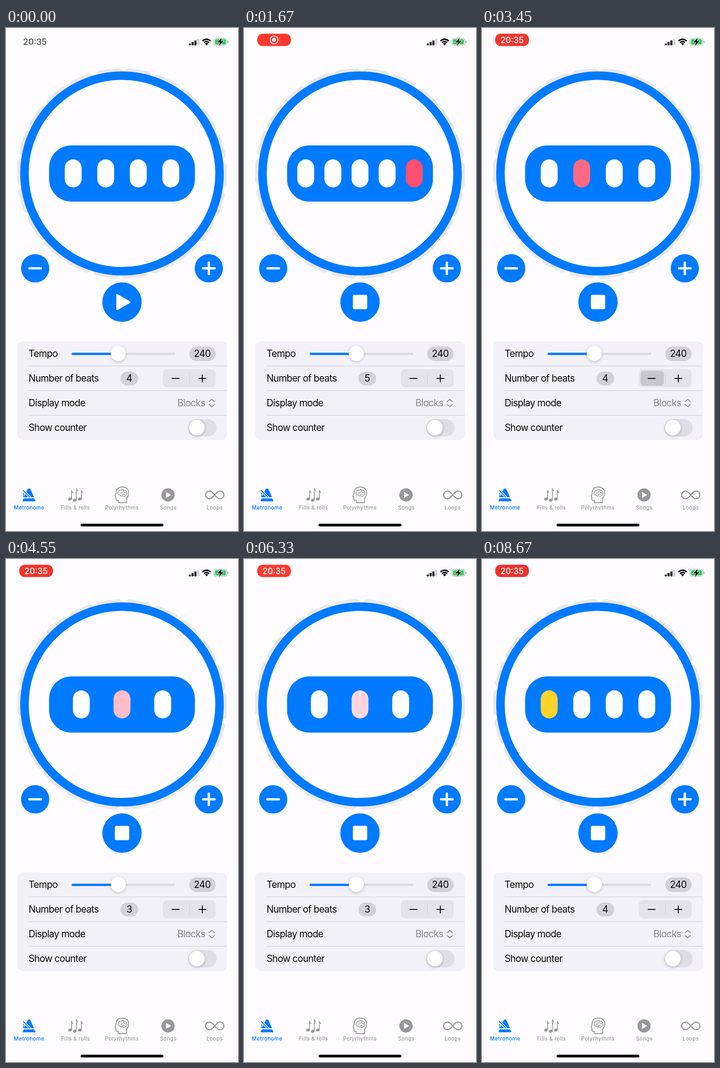
An HTML page for the animation above (8.7 s loop, 509x1101 px).

```html
<!DOCTYPE html>
<html lang="en">
<head>
<meta charset="utf-8">
<style>
  html, body { margin: 0; height: 100%; overflow: hidden; background: #fefcff; }
  svg { display: block; width: 509px; height: 1101px; }
  text { font-family: Inter, sans-serif; }
  .row text { font-size: 20.8px; letter-spacing: -.75px; fill: #0b0b0d; }
  .tab text { font-size: 11.5px; font-weight: 500; letter-spacing: .4px; text-anchor: middle; }
  .clock { font-size: 18.2px; text-anchor: middle; }
  .mid { text-anchor: middle; }
  .line { fill: none; stroke-linecap: round; stroke-linejoin: round; }
  .knob { fill: #fff; filter: drop-shadow(0 2px 3px #0003); }
</style>
</head>
<body>
<svg viewBox="0 0 509 1101">
  <g id="status">
    <text id="plainClock" class="clock" x="63.5" y="37.3" font-weight="600" fill="#5b5a5e">20:35</text>
    <g id="pill">
      <rect id="pillBack" x="29" y="12.5" width="74" height="27" rx="12"/>
      <g id="recIcon" fill="none" stroke="#fff" stroke-width="1.8">
        <circle cx="66" cy="26" r="8.6"/><circle cx="66" cy="26" r="4.4" fill="#fff" stroke="none"/>
      </g>
      <text id="pillClock" class="clock" x="66" y="33" font-weight="500" fill="#fff">20:35</text>
    </g>
    <g id="signal"></g>
    <g class="line" stroke="#000" stroke-width="3.2" style="stroke-linecap:butt">
      <path d="M431 28.4Q440 20.7 449 28.4M434.3 32Q440 27.2 445.7 32"/>
    </g>
    <path d="M436.4 34.3Q440 31.4 443.6 34.3L440 38Z"/>
    <rect x="456.5" y="22.5" width="28" height="15.5" rx="4.5" fill="none" stroke="#a5a4a8" stroke-width="1.2"/>
    <rect x="458.6" y="24.5" width="23.8" height="11.5" rx="2.8" fill="#34c759"/>
    <path d="M486 27.5q2.2 .6 2.2 2.8t-2.2 2.8z" fill="#a5a4a8"/>
    <path d="M473.5 21.5L463.5 31.5h6L467 39.5 477 29h-6z" stroke="#fff" stroke-width="1.6" paint-order="stroke"/>
  </g>

  <g id="teeth" fill="#e9e8ec" transform="rotate(1 254.5 318.3)"></g>
  <circle cx="254.5" cy="318.3" r="214" fill="#fefcff" stroke="#007aff" stroke-width="18.6"/>
  <rect x="94.5" y="257" width="320" height="123" rx="49" fill="#007aff"/>
  <g id="cells"></g>

  <g fill="#007aff">
    <circle id="minusButton" cx="64" cy="526" r="31"/>
    <circle cx="445" cy="526" r="31"/>
    <circle cx="254.5" cy="600" r="43.2"/>
  </g>
  <path class="line" stroke="#fff" stroke-width="5.2" d="M51.5 526h25M432.5 526h25M445 513.5v25"/>
  <path id="play" d="M244 584.5v31L271 600Z" fill="#fff" stroke="#fff" stroke-width="4" stroke-linejoin="round"/>
  <rect id="stop" x="238.8" y="584" width="31.5" height="31.5" rx="3.5" fill="#fff"/>

  <rect x="25" y="686" width="459.5" height="216" rx="12" fill="#f2f1f7"/>
  <path d="M49.5 739.7H484.5M49.5 793.7H484.5M49.5 847.7H484.5" stroke="#c9c8cd"/>
  <g class="row">
    <text x="49.5" y="720.3">Tempo</text>
    <text x="49.5" y="774.3">Number of beats</text>
    <text x="49.5" y="828.3">Display mode</text>
    <text x="49.5" y="882.3">Show counter</text>
    <path class="line" stroke="#dcdbe1" stroke-width="5" d="M146.5 713.2H369"/>
    <path class="line" stroke="#007aff" stroke-width="5" d="M146.5 713.2H246"/>
    <circle class="knob" cx="246.3" cy="712.3" r="16.6"/>
    <rect x="402" y="697" width="58" height="32" rx="16" fill="#d2d1d7"/>
    <text class="mid" x="430.6" y="720.3">240</text>
    <rect x="251" y="752" width="39" height="30.5" rx="15.2" fill="#d2d1d7"/>
    <text id="count" class="mid" x="270.2" y="774.3">4</text>
    <rect x="344" y="747" width="116" height="39.5" rx="9.5" fill="#e4e3e9"/>
    <path d="M402.5 756v22" stroke="#cecdd3"/>
    <rect id="press" x="348" y="750.5" width="51" height="32.5" rx="7" fill="#c7c6cc"/>
    <path id="stepMinus" class="line" stroke-width="2" d="M364.5 767h15.5"/>
    <path class="line" stroke="#0b0b0d" stroke-width="2" d="M423 767h15.5M430.7 759.2v15.6"/>
    <text x="376" y="828.3" style="fill:#8a898e">Blocks</text>
    <path class="line" stroke="#8a898e" stroke-width="1.7" d="M445.5 818l6-5 6 5M445.5 824l6 5 6-5"/>
    <rect x="400" y="856" width="62" height="38" rx="19" fill="#dfdee4"/>
    <circle class="knob" cx="418.7" cy="874.8" r="17"/>
  </g>

  <g class="tab" fill="#98979b">
    <g fill="#007aff">
      <path d="M39.5 1029.5H61Q64.5 1032 64.5 1036H36.500Q36.500 1032 39.500 1029.500Z"/>
      <path d="M47.500 1009.500Q50.500 1006 53.500 1009.500L61.500 1027H39L41.500 1021Z"/>
      <path d="M37.500 1012L53 1027.500" stroke="#fefcff" stroke-width="5"/>
      <path class="line" d="M38 1012.500L52 1026.500" stroke="#007aff" stroke-width="2"/>
      <path class="line" d="M38.500 1018v8.500h6" stroke="#007aff" stroke-width="1.500"/>
    </g>
    <g id="notes"></g>
    <path class="line" stroke="#98979b" stroke-width="1.9" d="M246.500 1039v-5h-3q-2.500 0-2.500-3v-5l-2-1.200 2.500-6q0-14 14-14 13.500 .5 13.500 13 0 7-4.500 11.500v9.700Z"/>
    <path class="line" stroke="#98979b" stroke-width="1.500" d="M247 1021q-3-2 0-5 0-5 5-4 4-4 7 0 6-1 6 5 2 5-3 6-2 4-6 1-4 2-5-2-4 1-4-1M251 1018q4 1 4-3M259 1012q-2 3 1 5 3-1 3 2M255 1022q1-3 5-1"/>
    <circle cx="355.500" cy="1022" r="14.500"/>
    <path d="M351.500 1016v12l10-6z" fill="#fefcff" stroke="#fefcff" stroke-linejoin="round"/>
    <path class="line" stroke="#98979b" stroke-width="2.500" d="M458 1022C453 1016 450 1013.500 446.500 1013.500A8.300 8.300 0 0 0 446.500 1030.500C450 1030.500 453 1028 458 1022S466 1013.500 469.500 1013.500A8.300 8.300 0 0 1 469.500 1030.500C466 1030.500 463 1028 458 1022Z"/>
    <g id="labels"></g>
  </g>
  <rect x="163.500" y="1085" width="182" height="6" rx="3"/>
</svg>
<script>
const $ = id => document.getElementById(id);
const add = (parent, tag, attrs) => {
  const el = document.createElementNS('http://www.w3.org/2000/svg', tag);
  for (const key in attrs) el.setAttribute(key, attrs[key]);
  return $(parent).appendChild(el);
};
const clamp = x => Math.max(0, Math.min(1, x));
const mix = (from, to, p) => `rgb(${from.map((v, i) => Math.round(v + (to[i] - v) * p))})`;

for (let i = 0; i < 4; i++) {
  const height = 4 + 3.4 * i;
  add('signal', 'rect', {x: 401 + 6.2 * i, y: 38 - height, width: 4.4, height, rx: 1, fill: i < 3 ? '#000' : '#cfced2'});
}
for (let i = 0; i < 22; i++) {
  add('teeth', 'rect', {x: 456, y: 289.8, width: 28.5, height: 57, rx: 9, transform: `rotate(${i * 360 / 22} 254.5 318.3)`});
}
for (const [x, y, top] of [[140.5, 1031, 1012], [151, 1033.5, 1008], [162, 1031, 1012]]) {
  add('notes', 'ellipse', {cx: x, cy: y, rx: 4.2, ry: 3.3, transform: `rotate(-20 ${x} ${y})`});
  add('notes', 'path', {class: 'line', stroke: '#98979b', 'stroke-width': 1.8, d: `M${x + 3.4} ${y}V${top}q1 4 3 5`});
}
['Metronome', 'Fills & rolls', 'Polyrhythms', 'Songs', 'Loops'].forEach((name, i) => {
  add('labels', 'text', {x: 50.7 + 101.8 * i, y: 1054, fill: i ? '#98979b' : '#007aff'}).textContent = name;
});
const cells = Array.from({length: 5}, () => add('cells', 'rect', {y: 287.5, width: 37, height: 61.5, rx: 18.5}));

const LOOP = 8700, START = 630, BEAT = 250;
const WHITE = [255, 255, 255], ACCENT = [255, 204, 0], NORMAL = [255, 45, 85];
const changes = [[0, 4], [1350, 5], [3400, 4], [4300, 3], [5150, 4], [6000, 3], [6800, 2], [7800, 3], [8250, 4]];
const beatsAt = t => changes.filter(([from]) => from <= t).pop()[1];

// Cell sounding on each beat; wraps at the count in force at that moment
const sequence = [];
for (let t = START, cell = -1; t < LOOP; t += BEAT) {
  cell = cell + 1 < beatsAt(t) ? cell + 1 : 0;
  sequence.push(cell);
}

function draw(t) {
  const beats = beatsAt(t), playing = t >= START - 30;
  const beat = Math.floor((t - START) / BEAT);
  const fade = (t - START) / BEAT - beat;
  const gap = (320 - 37 * beats) / (beats + 1);
  cells.forEach((cell, i) => {
    cell.style.display = i < beats ? '' : 'none';
    cell.setAttribute('x', 94.5 + gap + i * (37 + gap));
    cell.style.fill = sequence[beat] === i ? mix(i ? NORMAL : ACCENT, WHITE, fade) : '#fff';
  });

  $('count').textContent = beats;
  $('minusButton').style.fill = beats > 2 ? '#007aff' : '#98979b';
  $('stepMinus').style.stroke = beats > 2 ? '#0b0b0d' : '#8a898e';
  $('press').style.opacity = t >= 3390 && t < 3560 ? 1 : 0;
  $('play').style.opacity = playing ? 0 : 1;
  $('stop').style.opacity = playing ? 1 : 0;

  const shown = clamp((t - 200) / 200), swap = clamp((t - 2400) / 300);
  const glow = clamp(.65 + .65 * Math.cos(t * Math.PI / 1000));
  $('plainClock').style.opacity = 1 - shown;
  $('pill').style.opacity = shown;
  $('pillBack').style.fill = mix([223, 50, 45], [255, 58, 48], glow);
  $('recIcon').style.opacity = 1 - swap;
  $('pillClock').style.opacity = swap;
}

const begin = performance.now();
function tick() {
  draw((performance.now() - begin) % LOOP);
  requestAnimationFrame(tick);
}
tick();
</script>
</body>
</html>
```
